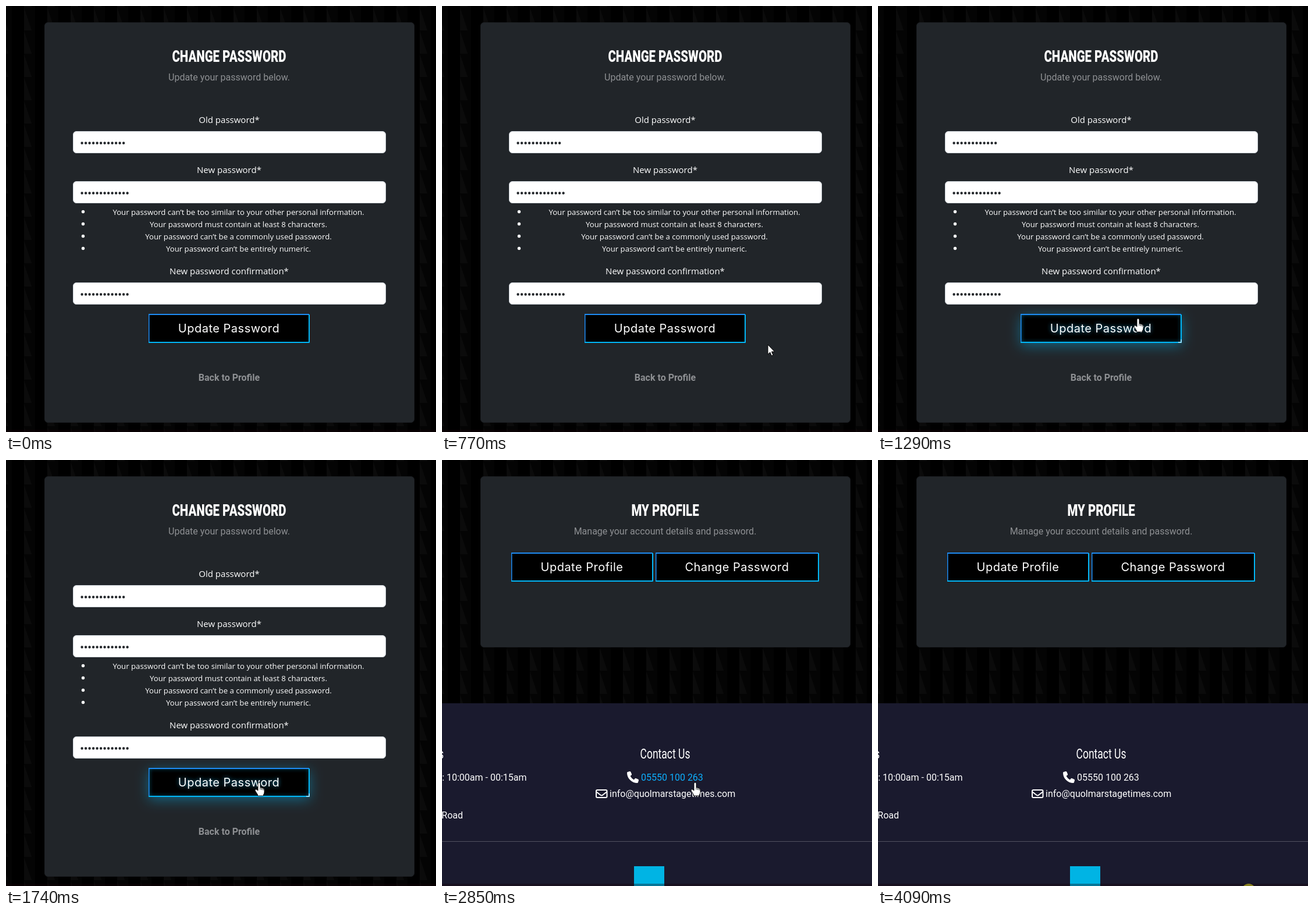
These frames come from a looping animation (739 by 732 pixels, 4.18 s). An HTML page:

```html
<!DOCTYPE html>
<html lang="en">
<head>
<meta charset="utf-8">
<title>Change password</title>
<style>
  html, body { margin: 0; width: 100%; height: 100%; overflow: hidden; background: #000; }
  svg { display: block; width: 739px; height: 732px; }
  text { fill: #fff; font: 16px Roboto, sans-serif; }
  .mid { text-anchor: middle; }
  .end { text-anchor: end; }
  .muted { fill: #8e9093; }
  .label { font: 15px "Open Sans", sans-serif; }
  .hint { font: 13.2px "Open Sans", sans-serif; }
  .title { font-size: 28px; font-weight: 800; }
  .heading { font-size: 24px; }
  .action { font: 20px Inter, sans-serif; letter-spacing: .5px; }
  .strong { font-weight: 700; }
</style>
</head>
<body>
<svg id="stage" viewBox="0 0 739 732">
  <defs>
    <pattern id="weave" width="40" height="40" patternUnits="userSpaceOnUse" x="31" y="3">
      <path d="M0 0H19V40H0Z" fill="#040404"/>
      <path d="M0 0L13 39H0Z" fill="#0b0b0b"/>
    </pattern>
    <filter id="wide" x="-30%" y="-100%" width="160%" height="300%"><feGaussianBlur stdDeviation="11"/></filter>
    <filter id="soft" x="-20%" y="-60%" width="140%" height="220%"><feGaussianBlur stdDeviation="3.5"/></filter>
    <clipPath id="buttonClip"><path d="M246 530H521V578H246Z"/></clipPath>
  </defs>
  <rect width="739" height="732" fill="url(#weave)"/>
  <g id="form"></g>
  <g id="profile"></g>
  <rect y="728" width="739" height="4" fill="#140008" opacity=".35"/>
  <circle id="press" cx="637" cy="740" r="12" fill="#87801f"/>
  <g id="cursor" stroke="#000" stroke-linejoin="round">
    <path id="arrow" fill="#fff" d="M0 0V16.5L3.8 13L6.4 19L9 17.9L6.5 12H11.6Z"/>
    <g id="hand" stroke-width=".9">
      <path fill="#fff" d="M-2 2Q-2 0 0 0T2 2V8.5L7 10Q9 10.7 9 12.8V16.5Q9 19.5 7.5 21V23H-2.5V21L-7 14Q-7.3 11.6-5 11.8L-2 14Z"/>
      <path fill="none" d="M2 8.5V12.5M4.6 9.5V13M7 10.3V13.5"/>
    </g>
  </g>
</svg>
<script>
const LOOP = 4180, SWITCH = 2850;
const $ = id => document.getElementById(id);

const text = (x, y, cls, str, extra = "") => `<text x="${x}" y="${y}" class="${cls}" ${extra}>${str}</text>`;

// Narrow display face
const narrow = (x, y, cls, str) => text(0, 0, cls, str, `transform="translate(${x} ${y}) scale(.73 1)"`);

const panel = height =>
  `<rect x="66.5" y="28.5" width="635" height="${height - 1}" rx="5.5" fill="#212529" stroke="#1d2024"/>`;

const field = (y, dots) => `
  <rect x="115.5" y="${y + .5}" width="537" height="37" rx="5.5" fill="#fff" stroke="#ced4da"/>
  <path d="M130.6 ${y + 20.5}h${(dots - 1) * 6.5 + .1}" stroke="#212529" stroke-width="4.4"
    stroke-linecap="round" stroke-dasharray="0 6.5"/>`;

const button = (x, y, width, label, glow = "") => {
  const t = y + 1, r = x + width - 1, b = y + 49;
  return `
    <rect x="${x}" y="${y}" width="${width}" height="50" rx="2" fill="#000"/>${glow}
    <g fill="none" stroke-width="2" stroke-linejoin="round">
      <path d="M${x} ${t}H${r}" stroke="#1e8cf5"/>
      <path d="M${x + .75} ${t}V${b}" stroke="#1e8cf5" stroke-width="1.5"/>
      <path d="M${x} ${b}H${r}V${t}" stroke="#00b7f8"/>
    </g>
    ${text(x + width / 2 - .5, y + 32, "mid action", label)}`;
};

const hints = [
  "Your password can’t be too similar to your other personal information.",
  "Your password must contain at least 8 characters.",
  "Your password can’t be a commonly used password.",
  "Your password can’t be entirely numeric."
];

const innerGlow = `
  <g class="glow" clip-path="url(#buttonClip)">
    <rect x="243" y="527" width="281" height="54" fill="none" stroke="#00bfff"
      stroke-width="7" opacity=".4" filter="url(#soft)"/>
    ${text(383, 561, "mid action", "Update Password", 'style="fill:#00bfff" opacity=".7" filter="url(#soft)"')}
  </g>`;

$("form").innerHTML = panel(688)
  + narrow(383.5, 96, "mid title", "CHANGE PASSWORD")
  + text(383.5, 128, "mid muted", "Update your password below.")
  + text(383.5, 201, "mid label", "Old password*") + field(215, 12)
  + text(383.5, 287, "mid label", "New password*") + field(301, 13)
  + hints.map((hint, i) => `<circle cx="132.5" cy="${353.5 + i * 21}" r="2.7" fill="#fff"/>`
      + text(399.5, 359 + i * 21, "mid hint", hint)).join("")
  + text(383.5, 461, "mid label", "New password confirmation*") + field(475, 13)
  + `<rect class="glow" x="245" y="534" width="277" height="50" fill="#00bfff" fill-opacity=".4" filter="url(#wide)"/>`
  + button(245, 529, 277, "Update Password", innerGlow)
  + `<path class="glow" d="M516 578H521V573" fill="none" stroke="#b5e9ff" stroke-width="1.5"/>`
  + text(383.5, 644, "mid muted strong", "Back to Profile");

$("profile").innerHTML = panel(294)
  + narrow(383.5, 96, "mid title", "MY PROFILE")
  + text(383.5, 128, "mid muted", "Manage your account details and password.")
  + button(119, 159, 244, "Update Profile")
  + button(367, 159, 281, "Change Password")
  + `<rect y="418" width="739" height="314" fill="#1a1a2e"/>
     <path d="M0 655.5H739" stroke="#51515f"/>`
  + narrow(3, 513, "end heading", "s")
  + text(145.5, 551, "end", ": 10:00am - 00:15am")
  + text(36, 616, "end", "Road")
  + narrow(383.5, 513, "mid heading", "Contact Us")
  + `<path transform="translate(318 535)" fill="#fff" d="M6.4 1Q5.8-.2 4.5.1L1.1 1Q0 1.4 0 2.5A17.5 17.5 0 0 0 17.5 20Q18.7 20 19 18.8L20 15.4Q20.2 14 19 13.5L15.3 12Q14.2 11.6 13.5 12.4L11.9 14.4A13 13 0 0 1 5.6 8.1L7.5 6.5Q8.4 5.8 8 4.7Z"/>
     <g fill="none" stroke="#fff" stroke-width="2">
       <rect x="265" y="567" width="18.5" height="13" rx="2"/>
       <path d="M265 570L272.5 575.8Q274.2 577 276 575.8L283.5 570"/>
     </g>`
  + text(342, 551, "", "05550 100 263", 'id="phone"')
  + text(288, 579, "", "info@quolmarstagetimes.com", 'id="mail"')
  + `<rect x="330" y="698" width="52" height="52" fill="#00b4e4"/>`;

// Pointer path: time, x, y
const path = [
  [220, 672, 728], [460, 628, 648], [730, 574, 591], [770, 560, 582], [960, 508, 563],
  [1270, 448, 538], [1290, 447, 537], [1470, 435, 554], [3370, 435, 554], [3540, 594, 694]
];

function pointerAt(t) {
  const i = path.findIndex(p => p[0] > t);
  if (i < 1) return null;
  const [t0, x0, y0] = path[i - 1], [t1, x1, y1] = path[i];
  const k = (t - t0) / (t1 - t0);
  return { x: x0 + (x1 - x0) * k, y: y0 + (y1 - y0) * k };
}

const inside = (p, l, t, r, b) => !!p && p.x > l && p.x < r && p.y > t && p.y < b;
const show = (el, on) => el.setAttribute("visibility", on ? "visible" : "hidden");
const glows = document.querySelectorAll(".glow");
const glowLevels = [...glows].map(el => Number(el.getAttribute("opacity") ?? 1));

function draw(t) {
  const onForm = t < SWITCH;
  $("form").style.display = onForm ? "" : "none";
  $("profile").style.display = onForm ? "none" : "";

  const p = pointerAt(t);
  const onButton = onForm && inside(p, 245, 529, 522, 579);
  const onPhone = !onForm && inside(p, 342, 536, 449, 561);
  const onMail = !onForm && inside(p, 288, 561, 503, 588);
  const linked = onButton || onPhone || onMail;

  const k = Math.min(1, Math.max(0, (t - 920) / 370));
  glows.forEach((el, i) => el.setAttribute("opacity", glowLevels[i] * (1 - (1 - k) ** 2)));

  $("phone").style.fill = onPhone ? "#0db0ff" : "#fff";
  $("mail").style.fill = onMail ? "#0db0ff" : "#fff";

  show($("arrow"), p && !linked);
  show($("hand"), p && linked);
  if (p) $("cursor").setAttribute("transform", `translate(${Math.round(p.x)} ${Math.round(p.y)})`);
  show($("press"), t >= 4090);
}

const start = performance.now();
function tick() {
  draw((performance.now() - start) % LOOP);
  requestAnimationFrame(tick);
}
tick();
</script>
</body>
</html>
```
